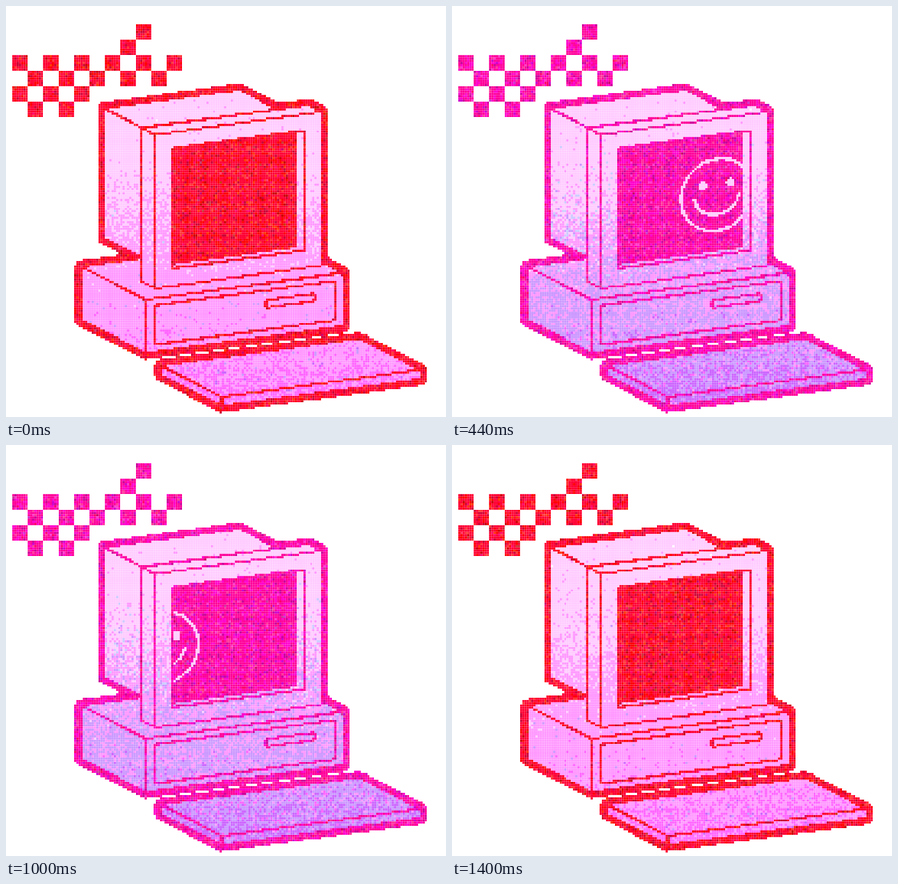
An HTML page with a canvas for the animation above (1440 ms loop, 775 by 722 pixels).

```html
<!DOCTYPE html>
<html lang="en">
<head>
<meta charset="utf-8">
<title>Pixel computer</title>
<style>
html, body { margin: 0; width: 100%; height: 100%; overflow: hidden; background: #fff; }
canvas { display: block; }
</style>
</head>
<body>
<canvas id="stage" width="775" height="722"></canvas>
<script>
const LOOP = 1440, STEP = 40;
const W = 775, H = 722;
const COLS = 200, ROWS = 186, CELL = 3.885, X0 = -0.6, Y0 = 1;
const EMPTY = 0, BODY = 1, INK = 2, GLASS = 3;
const SLOPE = -0.136, DEPTH = 0.515; // fall of the front edges and of the receding edges

function layer(w, h) {
  const c = document.createElement('canvas');
  c.width = w;
  c.height = h;
  return c.getContext('2d', { willReadFrequently: true });
}

const stage = document.getElementById('stage').getContext('2d');
stage.imageSmoothingEnabled = false;
const draft = layer(COLS, ROWS);
const pixels = layer(COLS, ROWS);
const image = pixels.createImageData(COLS, ROWS);
const kind = new Uint8Array(COLS * ROWS);

function clearDraft() {
  draft.setTransform(1, 0, 0, 1, 0, 0);
  draft.clearRect(0, 0, COLS, ROWS);
  draft.setTransform(1 / CELL, 0, 0, 1 / CELL, -X0 / CELL, -Y0 / CELL);
}

function trace(points, closed = true) {
  draft.beginPath();
  for (const [x, y] of points) draft.lineTo(x, y);
  if (closed) draft.closePath();
}

function stroke(points, width, closed) {
  trace(points, closed);
  draft.lineWidth = width;
  draft.stroke();
}

function fill(points) {
  trace(points);
  draft.fill();
}

// Turn the covered cells of the draft into one kind of cell
function stamp(value) {
  const { data } = draft.getImageData(0, 0, COLS, ROWS);
  for (let i = 0; i < kind.length; i++) if (data[i * 4 + 3] > 124) kind[i] = value;
  clearDraft();
}

// A panel on a front face, from its top left corner
function panel(x, y, w, h) {
  const rise = w * SLOPE;
  return [[x, y], [x + w, y + rise], [x + w, y + rise + h], [x, y + h]];
}

// A box from the top left corner of its front face
function box(x, y, w, h, d) {
  const [a, b, c, e] = panel(x, y, w, h);
  const back = ([px, py]) => [px - d, py - d * DEPTH];
  return {
    shape: [back(a), back(b), b, c, e, back(e)],
    edges: [[back(a), a, b], [a, e]]
  };
}

function drawComputer() {
  const base = box(246, 516, 348, 94, 114);
  const tube = box(239, 214, 240, 228, 67);
  const bezel = box(262, 226, 295, 270, 23);
  const keys = box(380, 687, 350, 16, 108);
  const boxes = [base, tube, bezel, keys];

  for (const { shape } of boxes) stroke(shape, 22);
  stamp(INK);
  for (const { shape, edges } of boxes) {
    fill(shape);
    stamp(BODY);
    stroke(shape, 4);
    for (const edge of edges) stroke(edge, 4.2, false);
    stamp(INK);
  }

  fill(glass);
  stamp(GLASS);
  stroke(panel(293, 250, 233, 211), 4.2);
  stroke(panel(262, 526, 319, 69), 4.2);
  stroke(panel(458, 517, 86, 13), 4.2);
  stamp(INK);
}

function drawCheckers() {
  for (let r = 0; r < 6; r++) {
    const last = r === 2 || r === 3 ? 12 - r : 8 - r;
    for (let c = r < 2 ? last : r % 2; c <= last; c += 2) {
      for (let y = 0; y < 7; y++) {
        const start = (8 + r * 7 + y) * COLS + 3 + c * 7;
        kind.fill(INK, start, start + 7);
      }
    }
  }
}

// Faint seams between neighbouring cells
function makeSeams() {
  const ctx = layer(W, H);
  const seam = (at, put) => {
    const p = Math.floor(at), f = at - p;
    ctx.fillStyle = `rgba(255,255,255,${f * (1 - f)})`;
    put(p);
  };
  for (let i = 1; i < COLS; i++) seam(X0 + i * CELL, p => ctx.fillRect(p, 0, 1, H));
  for (let i = 1; i < ROWS; i++) seam(Y0 + i * CELL, p => ctx.fillRect(0, p, W, 1));
  return ctx.canvas;
}

function arc(x, y, r, from = 0, to = 2 * Math.PI) {
  draft.beginPath();
  draft.arc(x, y, r, from, to);
}

// The smiley slides along the slope of the screen
function faceMask(t) {
  const dx = -0.34 * (t - 600);
  clearDraft();
  draft.save();
  trace(glass);
  draft.clip();
  draft.transform(1, SLOPE, 0, 1, 412 + dx, 339 + dx * SLOPE);
  draft.lineWidth = 4.8;
  arc(0, 0, 63);
  draft.stroke();
  arc(0, -6, 41, 0.25, Math.PI - 0.25);
  draft.stroke();
  for (const eye of [-25, 24]) {
    arc(eye, -18.5, 8);
    draft.fill();
  }
  draft.restore();
  return draft.getImageData(0, 0, COLS, ROWS).data;
}

function random(seed) {
  return () => {
    seed = (seed + 0x6D2B79F5) | 0;
    let v = Math.imul(seed ^ (seed >>> 15), seed | 1);
    v ^= v + Math.imul(v ^ (v >>> 7), v | 61);
    return ((v ^ (v >>> 14)) >>> 0) / 4294967296;
  };
}

const snap = v => Math.max(0, Math.min(255, Math.round(v / 51) * 51));

function render(step) {
  const t = step * STEP;
  const wave = Math.cos(t / LOOP * 2 * Math.PI);
  const shift = (1 - wave) / 2;
  const rnd = random(step * 7919 + 17);
  const noise = spread => (rnd() + rnd() + rnd() - 1.5) * 2 * spread;
  const face = faceMask(t);
  const out = image.data;

  for (let i = 0; i < kind.length; i++) {
    const k = kind[i], o = i * 4;
    out[o + 3] = k === EMPTY ? 0 : 255;
    if (k === EMPTY) continue;
    const y = Y0 + Math.floor(i / COLS) * CELL;
    let r, g, b = 255;
    if (k === GLASS && face[o + 3] > 115) {
      r = 255;
      g = 204;
    } else if (k === BODY) {
      r = Math.min(255, 294.5 - 0.13 * shift * (y + 255)) + noise(6 + y / 90);
      g = Math.min(200, 178.5 - 0.185 * (y - 370)) + noise(11);
    } else {
      r = 247 + noise(14);
      g = 10 + noise(12);
      b = 135 - 95 * wave + noise(20);
    }
    out[o] = snap(r);
    out[o + 1] = snap(g);
    out[o + 2] = snap(b);
  }

  pixels.putImageData(image, 0, 0);
  stage.fillStyle = '#fff';
  stage.fillRect(0, 0, W, H);
  stage.drawImage(pixels.canvas, X0, Y0, COLS * CELL, ROWS * CELL);
  stage.drawImage(seams, 0, 0);
}

const glass = panel(291, 250, 223, 205);
const seams = makeSeams();
draft.lineJoin = draft.lineCap = 'round';
clearDraft();
drawComputer();
drawCheckers();

const begin = performance.now();
let shown = -1;

function tick() {
  const step = Math.floor((performance.now() - begin) % LOOP / STEP);
  if (step !== shown) render(shown = step);
  requestAnimationFrame(tick);
}
tick();
</script>
</body>
</html>
```
